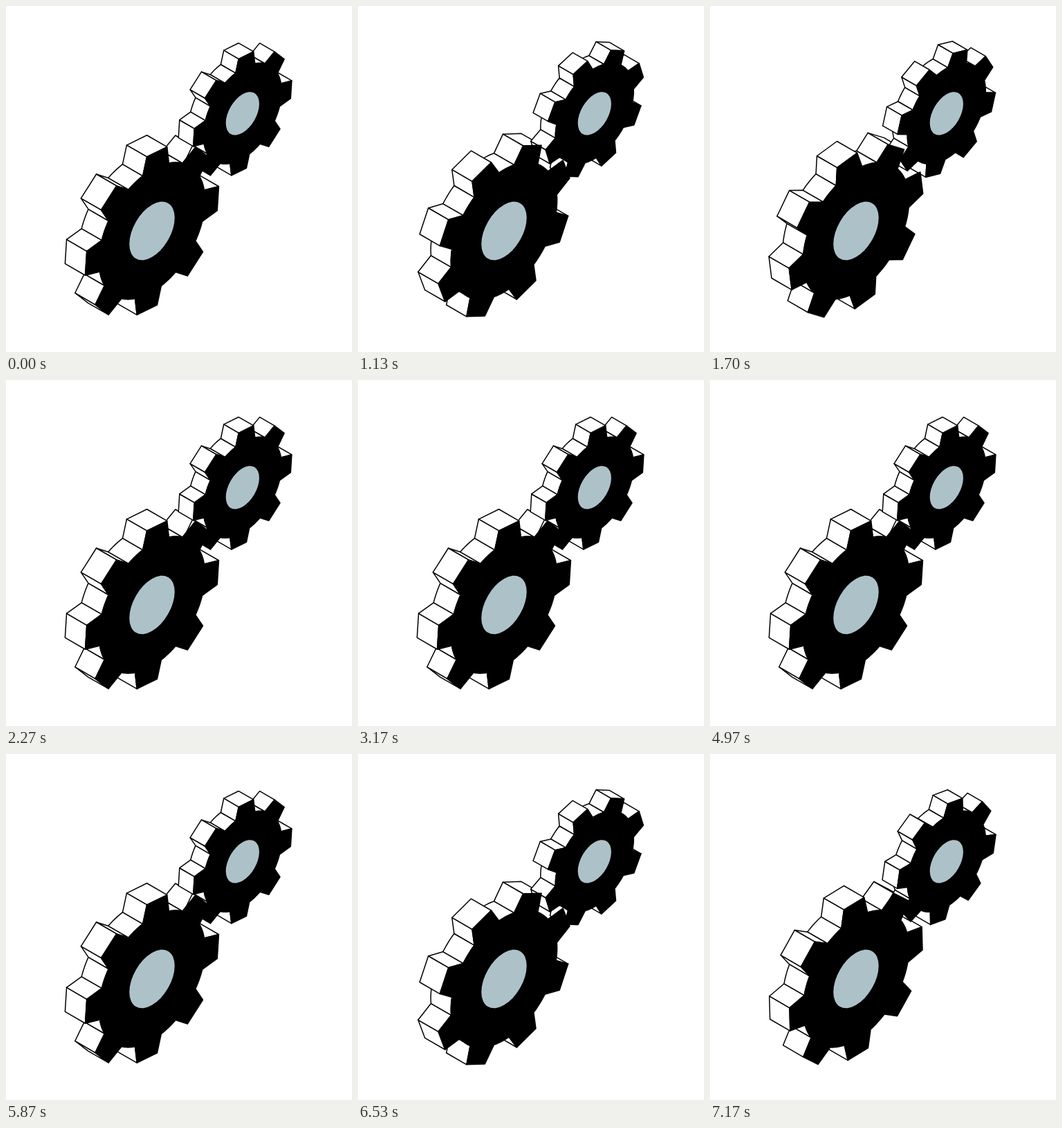
An HTML page with a canvas that plays this animation: 500 px wide and 500 px high, repeating every 7.21 s.

```html
<!DOCTYPE html>
<html>
<head>
<meta charset="utf-8">
<style>
html, body { margin: 0; width: 100%; height: 100%; overflow: hidden; background: #fff; }
canvas { display: block; }
</style>
</head>
<body>
<canvas id="stage" width="500" height="500"></canvas>
<script>
const ctx = document.getElementById('stage').getContext('2d');
const COS = Math.sqrt(3) / 2, RAD = Math.PI / 180;
const TEETH = 8, PITCH = 360 / TEETH;
const TIP = 111.7, ROOT = 88.5, HUB = 37.8, DEPTH = 33.7;
const TIP_HALF = 8.7, ROOT_HALF = 14.3;
const LOOP = 7210, POSES = 15;

const big = { x: 211, y: 325, scale: 1, phase: 4.3, dir: 1 };
const small = { x: 341.8, y: 155.4, scale: 0.737, phase: 4.2, dir: -1 };

// Angles run clockwise from straight up in the plane of the gear.
const polar = (r, deg) => [r * Math.sin(deg * RAD), -r * Math.cos(deg * RAD)];

// Isometric projection; w goes back into the picture.
const project = (g, [u, v], w = 0) => [
  g.x + g.scale * COS * (u - w),
  g.y + g.scale * (v - u / 2 - w / 2)
];

// Rim of the gear as a list of faces, each a short run of points.
function rim(turn) {
  const faces = [];
  for (let i = 0; i < TEETH; i++) {
    const a = turn + i * PITCH, gap = PITCH - 2 * ROOT_HALF;
    const valley = [];
    for (let j = 0; j <= 6; j++) valley.push(polar(ROOT, a - ROOT_HALF - gap * (1 - j / 6)));
    const corners = [polar(ROOT, a - ROOT_HALF), polar(TIP, a - TIP_HALF),
                     polar(TIP, a + TIP_HALF), polar(ROOT, a + ROOT_HALF)];
    faces.push(valley);
    for (let j = 0; j < 3; j++) faces.push([corners[j], corners[j + 1]]);
  }
  return faces;
}

function polygon(points, fill) {
  ctx.beginPath();
  points.forEach(p => ctx.lineTo(...p));
  ctx.closePath();
  ctx.fillStyle = fill;
  ctx.fill();
  ctx.stroke();
}

function drawSides(g, faces) {
  const nearness = f => f[0][0] + f[0][1] + f.at(-1)[0] + f.at(-1)[1];
  faces
    .filter(f => f.at(-1)[0] - f[0][0] > f.at(-1)[1] - f[0][1])
    .sort((a, b) => nearness(b) - nearness(a))
    .forEach(f => polygon([
      ...f.map(p => project(g, p)),
      ...f.map(p => project(g, p, DEPTH)).reverse()
    ], '#fff'));
}

function drawFront(g, faces) {
  polygon(faces.flat().map(p => project(g, p)), '#000');
  ctx.save();
  ctx.transform(g.scale * COS, -g.scale / 2, 0, g.scale, g.x, g.y);
  ctx.beginPath();
  ctx.arc(0, 0, HUB, 0, 2 * Math.PI);
  ctx.fillStyle = '#adc2c8';
  ctx.fill();
  ctx.restore();
}

// 30 pictures a second, showing poses that last 30 ms each.
function poseAt(ms) {
  const n = Math.min(215, Math.floor((3 * Math.floor(ms / 10) + 1) / 10));
  return Math.floor(n * 10 / 9) % POSES;
}

function draw(now) {
  const step = poseAt(now % LOOP) * PITCH / POSES;
  const gears = [big, small].map(g => [g, rim(g.phase + g.dir * step)]);
  ctx.fillStyle = '#fff';
  ctx.fillRect(0, 0, 500, 500);
  ctx.strokeStyle = '#000';
  ctx.lineWidth = 1.5;
  ctx.lineJoin = 'round';
  gears.forEach(([g, faces]) => drawSides(g, faces));
  gears.forEach(([g, faces]) => drawFront(g, faces));
}

let start;
function tick(now) {
  start ??= now;
  draw(now - start);
  requestAnimationFrame(tick);
}
draw(0);
requestAnimationFrame(tick);
</script>
</body>
</html>
```
